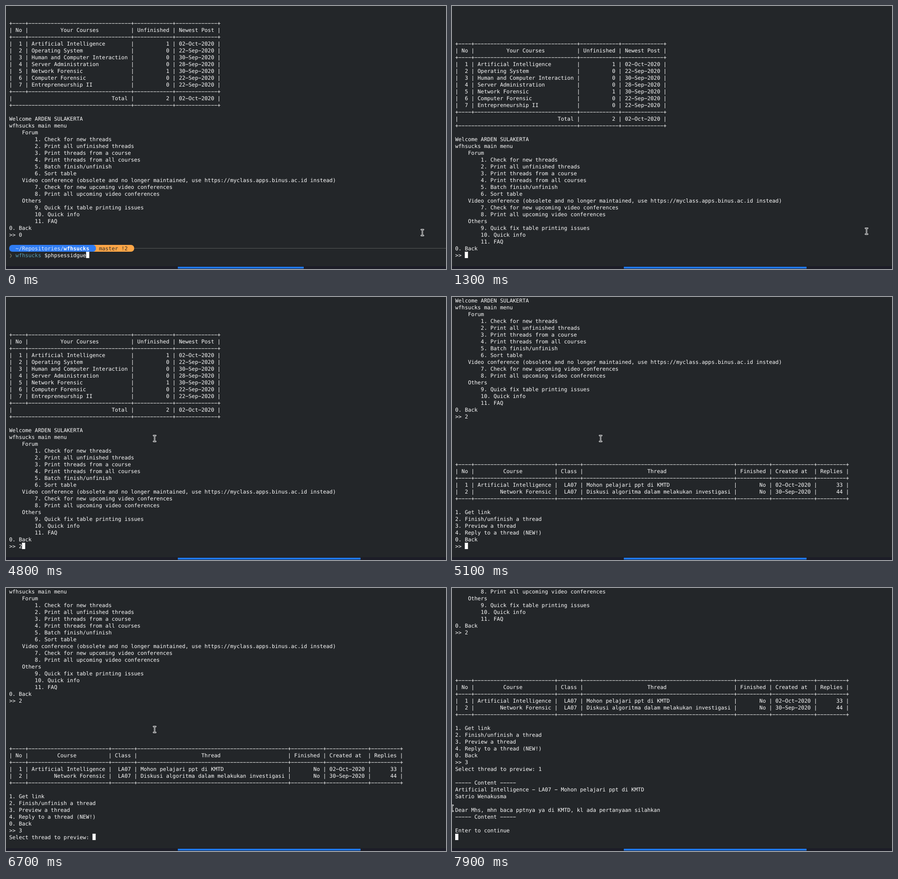
An HTML page for the animation above (8000 ms loop, 968 by 578 pixels).

```html
<!DOCTYPE html>
<html lang="en">
<head>
<meta charset="utf-8">
<title>Terminal session</title>
<style>
  html, body { margin: 0; width: 100%; height: 100%; overflow: hidden; background: #232629; }
  svg { display: block; width: 968px; height: 578px; }
  text {
    font: 11.71px "DejaVu Sans Mono", monospace;
    fill: #fcfcfc;
    white-space: pre;
    text-rendering: geometricPrecision;
  }
</style>
</head>
<body>
<svg id="stage" viewBox="0 0 968 578" xmlns="http://www.w3.org/2000/svg"></svg>
<script>
const LOOP = 8000, STEP = 100;
const LEFT = 7, CELL = 7.05, ROW = 15, LAST_ROW = 36;
const BG = '#232629', FG = '#fcfcfc', BLUE = '#2f7cf3', ORANGE = '#fda647';
const USER = 'ARDEN SULAKERTA', TEACHER = 'Satrio Wenakusma', TASK = 'Mohon pelajari ppt di KMTD';
const COMMAND = '❯ wfhsucks $phpsessidgue';
const PILLS = '<pills>';
const stage = document.getElementById('stage');

// Log text

const rule = widths => '+' + widths.map(w => '-'.repeat(w) + '+').join('');
const center = (s, w) => {
  const left = Math.floor((w - s.length) / 2);
  return (' '.repeat(left) + s).padEnd(w);
};
const cell = (s, w, align) =>
  align === 'l' ? (' ' + s).padEnd(w) : align === 'r' ? (s + ' ').padStart(w) : center(s, w);
const tableRow = (cells, widths, aligns = '') =>
  '|' + cells.map((c, i) => cell(c, widths[i], aligns[i]) + '|').join('');

function courseTable() {
  const widths = [4, 32, 12, 13], totals = [37, 12, 13];
  const courses = [
    ['Artificial Intelligence', '1', '02-Oct-2020'],
    ['Operating System', '0', '22-Sep-2020'],
    ['Human and Computer Interaction', '0', '30-Sep-2020'],
    ['Server Administration', '0', '28-Sep-2020'],
    ['Network Forensic', '1', '30-Sep-2020'],
    ['Computer Forensic', '0', '22-Sep-2020'],
    ['Entrepreneurship II', '0', '22-Sep-2020']
  ];
  return [
    rule(widths),
    tableRow(['No', 'Your Courses', 'Unfinished', 'Newest Post'], widths),
    rule(widths),
    ...courses.map((c, i) => tableRow([String(i + 1), ...c], widths, 'rlrr')),
    rule(widths),
    tableRow(['Total', '2', '02-Oct-2020'], totals, 'rrr'),
    rule(totals)
  ];
}

function threadTable() {
  const widths = [4, 25, 7, 47, 10, 13, 9];
  const aligns = 'rrrlrrr';
  return [
    rule(widths),
    tableRow(['No', 'Course', 'Class', 'Thread', 'Finished', 'Created at', 'Replies'], widths),
    rule(widths),
    tableRow(['1', 'Artificial Intelligence', 'LA07', TASK, 'No', '02-Oct-2020', '33'], widths, aligns),
    tableRow(['2', 'Network Forensic', 'LA07', 'Diskusi algoritma dalam melakukan investigasi',
      'No', '30-Sep-2020', '44'], widths, aligns),
    rule(widths)
  ];
}

const MENU = `Welcome ${USER}
wfhsucks main menu
    Forum
        1. Check for new threads
        2. Print all unfinished threads
        3. Print threads from a course
        4. Print threads from all courses
        5. Batch finish/unfinish
        6. Sort table
    Video conference (obsolete and no longer maintained, use https://myclass.apps.binus.ac.id instead)
        7. Check for new upcoming video conferences
        8. Print all upcoming video conferences
    Others
        9. Quick fix table printing issues
        10. Quick info
        11. FAQ
0. Back`.split('\n');

const THREAD_MENU = ['', '1. Get link', '2. Finish/unfinish a thread', '3. Preview a thread',
  '4. Reply to a thread (NEW!)', '0. Back'];

const PREVIEW = ['', '----- Content -----', 'Artificial Intelligence - LA07 - ' + TASK, TEACHER, '',
  'Dear Mhs, mhn baca pptnya ya di KMTD, kl ada pertanyaan silahkan',
  '----- Content -----', '', 'Enter to continue', ''];

const home = answer => [...courseTable(), '', ...MENU, '>> ' + answer];
const threads = answer => [...home('2'), ...Array(6).fill(''), ...threadTable(), ...THREAD_MENU, '>> ' + answer];
const select = answer => [...threads('3'), 'Select thread to preview: ' + answer];

// Each screen: start time, log lines, row of the last line
const SCREENS = [
  [0, [...home('0'), '', PILLS, COMMAND], LAST_ROW],
  [400, [...home('0'), COMMAND, ''], 34],
  [1300, home(''), LAST_ROW],
  [4800, home('2'), LAST_ROW],
  [5000, [...home('2'), ''], LAST_ROW],
  [5100, threads(''), LAST_ROW],
  [6500, threads('3'), LAST_ROW],
  [6700, select(''), LAST_ROW],
  [6800, select('1'), LAST_ROW],
  [7000, [...select('1'), ''], LAST_ROW],
  [7100, [...select('1'), ...PREVIEW], LAST_ROW]
];

// Pointer path: time, x, y
const POINTER = [
  [0, 916, 498], [900, 916, 498], [1300, 912, 495], [2300, 912, 495], [2700, 40, 296],
  [2800, 62, 293], [2900, 62, 293], [3200, 241, 287], [3400, 241, 287], [3700, 327, 311],
  [7400, 327, 311], [7800, 8, 508], [7900, 0, 484], [LOOP, 0, 484]
];
const SELECT_FROM = 3000, SELECT_TO = 3800, SELECT_COL = 8, SELECT_ROW = 19;

function pointerAt(t) {
  const i = POINTER.findIndex(p => p[0] > t);
  const [t0, x0, y0] = POINTER[i - 1], [t1, x1, y1] = POINTER[i];
  const k = (t - t0) / (t1 - t0), e = k * k * (3 - 2 * k);
  return [Math.round(x0 + (x1 - x0) * e), Math.round(y0 + (y1 - y0) * e)];
}

// Drawing

const colX = col => LEFT + col * CELL;
const rect = (x, y, w, h, fill) => `<rect x="${x}" y="${y}" width="${w}" height="${h}" fill="${fill}"/>`;
const text = (s, col, row, style = '') =>
  `<text x="${colX(col)}" y="${row * ROW + 12}" style="${style}">${s.replace(/-/g, '\u2212')}</text>`;

function pills(row) {
  const y = row * ROW, mid = y + 7.5;
  const pill = (x0, x1, fill) => `<rect x="${x0}" y="${y}" width="${x1 - x0}" height="15" rx="7" fill="${fill}"/>`;
  return rect(282, mid - 0.5, 686, 1, '#585b58')
    + rect(190, y, 20, 15, ORANGE) + pill(196, 282, ORANGE) + pill(7, 198, BLUE)
    + text('~/Repositories/', 2, row, 'fill:#e4ecf8')
    + text('wfhsucks', 17, row, 'font-weight:bold')
    + text('master !2', 28, row, 'fill:#33302c');
}

function command(s, row) {
  const [mark, name, arg] = s.split(' ');
  return text(mark, 0, row, 'fill:#70705f') + text(name, 2, row, 'fill:#5b9fb5') + text(arg, 11, row);
}

function line(s, row) {
  if (s === PILLS) return pills(row);
  return s[0] === '❯' ? command(s, row) : text(s, 0, row);
}

function selection(endCol) {
  const n = endCol - SELECT_COL;
  if (n <= 0) return '';
  return rect(colX(SELECT_COL), SELECT_ROW * ROW + 0.5, n * CELL, 14.5, FG)
    + text(USER.slice(0, n), SELECT_COL, SELECT_ROW, 'fill:' + BG);
}

function pointer(x, y) {
  const d = `M${x - 2.5} ${y - 6.5}h2l.5.5l.5-.5h2M${x} ${y - 6}v12M${x - 2.5} ${y + 6.5}h2l.5-.5l.5.5h2`;
  const stroke = (color, w) =>
    `<path d="${d}" fill="none" stroke="${color}" stroke-width="${w}" stroke-linecap="round"/>`;
  return stroke(FG, 2.8) + stroke(BG, 1);
}

function tabBar(t) {
  return rect(0, 572, 968, 6, '#1c1d27') + rect(378, 573, t < 400 ? 277 : 402, 4, '#1f78ee');
}

function render(t) {
  const [, lines, last] = SCREENS.filter(s => s[0] <= t).pop();
  const top = last - lines.length + 1;
  const [x, y] = pointerAt(t);
  let out = rect(0, 0, 968, 578, BG);
  lines.forEach((s, i) => { if (s && top + i >= 0) out += line(s, top + i); });
  if (t >= SELECT_FROM && t < SELECT_TO) {
    out += selection(Math.min(33, Math.round((x - LEFT) / CELL)));
  }
  out += rect(colX(lines[lines.length - 1].length), last * ROW, 7, 14, FG);
  stage.innerHTML = out + tabBar(t) + pointer(x, y);
}

let shown = -1;
function tick() {
  const t = Math.floor(performance.now() % LOOP / STEP) * STEP;
  if (t !== shown) render(shown = t);
  requestAnimationFrame(tick);
}
tick();
</script>
</body>
</html>
```
